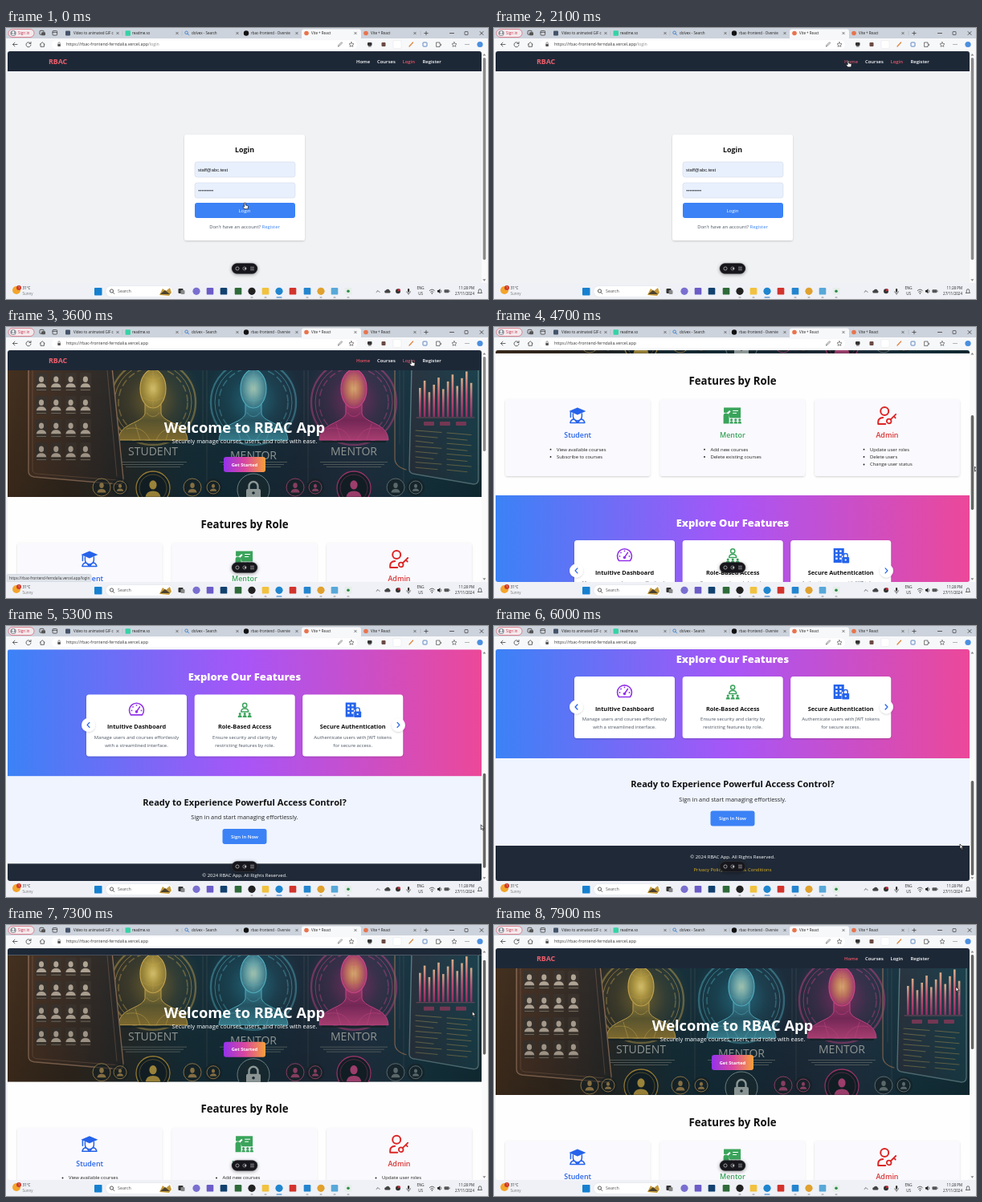
Write an HTML page that moves like this. It is 600 px wide and 338 px high and loops after 8 s.

```html
<!DOCTYPE html>
<html lang="en">
<head>
<meta charset="utf-8">
<title>RBAC App</title>
<style>
html, body { margin: 0; width: 100%; height: 100%; overflow: hidden; background: #fff; }
svg { display: block; width: 100%; height: 100%; }
text { font-family: "Open Sans", "Noto Sans", sans-serif; white-space: pre; }
.ui { font-family: "Liberation Sans", Arial, sans-serif; }
</style>
</head>
<body>
<svg id="stage" viewBox="0 0 600 338"></svg>
<script>
const LOOP = 8000, TOP = 29, MAX_SCROLL = 382;
const URL_BASE = 'https://rbac-frontend-ferndalia.vercel.app';
const REM = 5.92;

// Drawing helpers; text is placed by its vertical centre.
const text = (x, y, s, size = REM, fill = '#111', weight = 400, anchor = 'start', extra = '') =>
  `<text x="${x}" y="${y + size * 0.36}" font-size="${size}" fill="${fill}" font-weight="${weight}" text-anchor="${anchor}" ${extra}>${s}</text>`;
const mid = (x, y, s, size, fill, weight, extra) => text(x, y, s, size, fill, weight, 'middle', extra);
const rect = (x, y, w, h, fill, r = 0, extra = '') =>
  `<rect x="${x}" y="${y}" width="${w}" height="${h}" rx="${r}" fill="${fill}" ${extra}/>`;
const dot = (x, y, r, fill, extra = '') => `<circle cx="${x}" cy="${y}" r="${r}" fill="${fill}" ${extra}/>`;
const ring = (x, y, r, stroke, w = 1, extra = '') =>
  dot(x, y, r, 'none', `stroke="${stroke}" stroke-width="${w}" ${extra}`);
const line = (d, stroke = '#444', w = 0.7, extra = '') =>
  `<path d="${d}" fill="none" stroke="${stroke}" stroke-width="${w}" stroke-linecap="round" stroke-linejoin="round" ${extra}/>`;
const shape = (d, fill, extra = '') => `<path d="${d}" fill="${fill}" ${extra}/>`;
const at = (x, y, body) => `<g transform="translate(${x} ${y})">${body}</g>`;
const range = n => [...Array(n).keys()];
const stops = colors => colors.map((c, i) => `<stop offset="${i / (colors.length - 1)}" stop-color="${c}"/>`).join('');
const grad = (id, colors, down) =>
  `<linearGradient id="${id}" x2="${down ? 0 : 1}" y2="${down ? 1 : 0}">${stops(colors)}</linearGradient>`;
const radial = (id, colors) => `<radialGradient id="${id}">${stops(colors)}</radialGradient>`;

const defs = `<defs>
  ${grad('heroBg', ['#44301f', '#33291f', '#262b2a', '#17303a', '#15303d', '#1d2c3b', '#223344', '#173743', '#122f39'])}
  ${grad('shade', ['#0000', '#0008'], true)}
  ${grad('leftGlass', ['#4a3324', '#27292a'])}
  ${grad('rightGlass', ['#2a3440', '#1b414d'])}
  ${grad('explore', ['#3b82f6', '#a855f7', '#ec4899'])}
  ${grad('start', ['#9333ea', '#d946a0', '#f6a03a'])}
  ${grad('bars', ['#d8b08a', '#c4567a', '#9c2f6a'], true)}
  ${grad('gold', ['#a08a3c', '#5f5a32', '#8a7434'], true)}
  ${grad('cyan', ['#3f8ea0', '#27596a', '#3b8798'], true)}
  ${grad('pink', ['#a23c6c', '#7c2a5c', '#b8447c'], true)}
  ${radial('goldFace', ['#d8c470', '#b39c46', '#8c7a36'])}
  ${radial('cyanFace', ['#a9c9b4', '#6fa6a8', '#38798a'])}
  ${radial('pinkFace', ['#dcb070', '#c2785e', '#a23c6c'])}
  ${radial('goldGlow', ['#a08030', '#a0803055', '#a0803000'])}
  ${radial('cyanGlow', ['#2f90a8', '#2f90a855', '#2f90a800'])}
  ${radial('pinkGlow', ['#a82c74', '#a82c7455', '#a82c7400'])}
  <filter id="soft" x="-20%" y="-20%" width="140%" height="150%"><feDropShadow dx="0" dy="1" stdDeviation="1.3" flood-opacity=".18"/></filter>
  <filter id="float" x="-40%" y="-60%" width="180%" height="240%"><feDropShadow dx="0" dy="1" stdDeviation="2.2" flood-opacity=".4"/></filter>
  <clipPath id="view">${rect(2, TOP, 590, 289, '#000', 3)}</clipPath>
  <clipPath id="heroClip">${rect(2, 54, 590, 158, '#000')}</clipPath>
</defs>`;

// Browser chrome
function tab(x, icon, title, closeX) {
  return icon + text(x, 6.5, title, 4.5, '#222') +
    line(`M${closeX - 1.3} 5.2l2.6 2.6m0-2.6l-2.6 2.6`, '#333', 0.6);
}
function chrome() {
  const plus = (x, y, r) => `M${x - r} ${y}h${2 * r}M${x} ${y - r}v${2 * r}`;
  const star = x => line(`M${x} 17.6l.9 1.9 2.1.3-1.5 1.4.4 2.1-1.9-1-1.9 1 .4-2.1-1.5-1.4 2.1-.3z`, '#444', 0.6);
  return rect(0, 0, 600, 338, '#f3f4f7') + rect(0, 0, 600, 13.5, '#cdd3dc') +
    rect(0, 13, 600, 16, '#f7f8fa') +
    rect(368, 1.5, 74, 13, '#f7f8fa', 3) +
    rect(3, 1.5, 32, 10, '#f4e9ec', 5, 'stroke="#d9485a" stroke-width=".6"') +
    dot(9, 6.5, 3.6, '#8a9099') + dot(9, 5.4, 1.3, '#fff') + shape('M6.6 8.8a2.5 2.2 0 0 1 4.8 0z', '#fff') +
    text(15, 6.5, 'Sign in', 4.7, '#c4314b') +
    rect(42, 3.3, 5, 5, 'none', 1, 'stroke="#333" stroke-width=".8"') + rect(44, 5.3, 5, 4, '#555', 1) +
    rect(58, 3.5, 5.6, 5.6, 'none', 1, 'stroke="#333" stroke-width=".7"') + line('M58 5.4h5.6', '#333') +
    tab(84, rect(74, 3.5, 6, 6, '#44536a', 1), 'Video to animated GIF c', 139) +
    tab(157, rect(148.5, 3.2, 6.5, 6.5, '#35d3a5', 1), 'readme.so', 213) +
    tab(231, ring(224.6, 5.8, 1.8, '#2878d0', 0.8) + line('M226 7.2l1.7 1.7', '#2878d0', 0.8), 'dolvex - Search', 288) +
    tab(305, dot(299, 6.5, 3.2, '#111'), 'rbac-frontend - Overvie', 362) +
    tab(380, dot(374, 6.5, 2.8, '#e8744e'), 'Vite + React', 435) +
    tab(454, dot(448, 6.5, 2.8, '#e8744e'), 'Vite + React', 509) +
    [145, 219, 293, 516].map(x => line(`M${x} 4v5`, '#a5acb8', 0.5)).join('') +
    line(plus(523, 6.5, 2.2), '#333') +
    line('M552.5 6.5h5M590 4.5l4 4m0-4l-4 4', '#222') +
    rect(571, 4.5, 4, 4, 'none', 0.5, 'stroke="#222" stroke-width=".6"') +
    line('M14 20.5H8.5m2.4-2.4l-2.4 2.4 2.4 2.4', '#444', 0.8) +
    line('M30.6 19.2a3 3 0 1 0 .4 2M31 17.5v2h-2', '#444', 0.8) +
    line('M42.2 20.5l3-2.8 3 2.8M43 20v3.3h4.4V20', '#444', 0.8) +
    rect(57, 15.2, 380, 11, '#fff', 5.5) +
    rect(64.3, 19.9, 3.6, 3, '#555', 0.6) + line('M65 19.8v-1a1.1 1.1 0 0 1 2.2 0v1', '#555', 0.6) +
    `<text x="75" y="22.4" font-size="5.25" fill="#333">${URL_BASE}<tspan id="path" fill="#888">/login</tspan></text>` +
    line('M413.5 22.8l.5-1.6 3.6-3.4 1 1-3.6 3.5z', '#444', 0.6) + star(430) +
    rect(450, 18, 5.5, 4, '#333', 1) + rect(451, 22, 3.6, 1.5, '#777') +
    rect(467.5, 18, 5, 5, '#6b4a44', 1) + rect(482, 15.5, 10, 10, '#fff', 1.5, 'stroke="#ddd" stroke-width=".4"') +
    line('M502 23l4.6-5', '#e0823a', 1.2) + rect(519, 18, 5, 5, 'none', 0.8, 'stroke="#356bb3" stroke-width=".8"') +
    line('M536 18h4v2.2h1.6v1.5H540v1.7h-4z', '#444') + star(558) +
    [572, 574, 576].map(x => dot(x, 20.5, 0.5, '#444')).join('') +
    dot(590, 20.5, 3.6, '#4b8fe0');
}

// Hero artwork
const person = (x, y, k, fill) => at(x, y, `<g transform="scale(${k})">` +
  `<ellipse cy="-3" rx="3.4" ry="4.2" fill="${fill}"/>` + shape('M-7 8Q-6 2.5 0 2.5T7 8z', fill) + '</g>');

function bust(x, y, tone, glow, label) {
  const halo = dot(x, 92, 62, `url(#${tone}Glow)`, 'opacity=".6"') +
    ring(x, 94, 53, glow, 2.4, 'opacity=".45"') + ring(x, 94, 48, glow, 0.7, 'opacity=".8"') +
    ring(x, 94, 43, glow, 1.6, 'opacity=".4" stroke-dasharray="9 4"');
  const body = shape('M-43 141C-42 119-14 121-10 108V92H10V108C14 121 42 119 43 141z', `url(#${tone})`,
    `stroke="${glow}" stroke-width="1"`) +
    line('M-8 107Q0 117 8 107M-33 127Q-12 122-4 141M33 127Q12 122 4 141M-22 121l6 20M22 121l-6 20', glow, 0.7, 'opacity=".8"');
  const head = `<ellipse cy="77" rx="16" ry="24" fill="url(#${tone}Face)" stroke="${glow}" stroke-width="1.2"/>` +
    line('M0 54v46M-11 62Q0 70 11 62M-13 88Q0 96 13 88', glow, 0.6, 'opacity=".5"');
  return halo + at(x, 0, body + head) + rect(x - 40, 142, 80, 2, '#162529') +
    mid(x, y, label, 14, '#a3a9a5');
}
function hero() {
  const faces = range(16).map(i => {
    const x = 44 + (i % 4) * 18.3, y = 68 + Math.floor(i / 4) * 29;
    return rect(x - 7, y - 11, 14, 23, '#3b342e', 1.5) + person(x, y, 0.9, '#b3a797') +
      rect(x - 6, y + 10, 12, 1, '#7a6c5c');
  }).join('');
  const bars = range(12).map(i => {
    const h = 36 + i * 1.3 + 9 * Math.sin(i * 2.1);
    return rect(514 + i * 5.8, 112 - h, 2.6, h, 'url(#bars)');
  }).join('');
  const rows = range(8).map(i =>
    line(`M510 ${129 + i * 6.6}l${32 - (i % 3) * 5} 2.5M549 ${132 + i * 6.6}l${30 - (i % 2) * 5} 2.5`, '#74734f', 0.9)).join('');
  const badge = (x, c, fill) => dot(x, 201, 21, '#14232a') + ring(x, 201, 21, c, 1.3) + ring(x, 201, 17, c, 0.5) + person(x, 201, 1.35, fill);
  const minis = [119, 142, 232, 258, 360, 385, 485, 510].map((x, i) => {
    const c = i < 4 ? '#a08550' : i < 6 ? '#a04a74' : '#6d7d80';
    return dot(x, 200, 11, '#1a2528', 'opacity=".6"') + ring(x, 200, i % 2 ? 8 : 11, c, 1) + person(x, 200, i % 2 ? 0.6 : 0.8, c);
  }).join('');
  const frame = 'stroke="#8a6c56" stroke-width="1.4"';
  return `<g clip-path="url(#heroClip)">` + rect(2, 54, 590, 158, 'url(#heroBg)') +
    [120, 245, 371, 490].map(x => line(`M${x} 54v92M${x + 5} 54v140`, '#4a585a', 0.7, 'opacity=".7"')).join('') +
    bust(183, 155, 'gold', '#c9a850', 'STUDENT') + bust(433, 155, 'pink', '#d0488c', 'MENTOR') + bust(308, 160, 'cyan', '#55b2c4', 'MENTOR') +
    [183, 308, 433].map(x => range(3).map(i => rect(x - 42 + i * 4, 168 + i * 3, 84 - i * 8, 0.8, '#66716f')).join('')).join('') +
    shape('M28 50H132L146 189q0 7-6 7L35 187q-7-1-7-7z', 'url(#leftGlass)', frame) +
    line('M33 54V178q0 4 5 5L139 191M126 54l12 132', '#7a5f4a', 0.6) + faces +
    shape('M505 50H588V190q0 6-6 6L507 183q-5-1-5-6z', 'url(#rightGlass)', 'stroke="#5b7b82" stroke-width="1.4"') +
    line('M484 54v110q0 10 14 14', '#8a6c56', 1.2) + bars + line('M511 113h72', '#a0566c') +
    [520, 540, 560].map(x => rect(x, 118, 13, 5, '#7d3c5a', 1)).join('') + rows +
    minis + badge(183, '#b0903c', '#b89c44') + badge(433, '#b43c78', '#bc4a82') +
    dot(308, 203, 20, '#1b3037') + ring(308, 203, 20, '#7e979a', 1) + rect(299, 202, 18, 14, '#a9b5b4', 2) +
    line('M302.5 202v-3.5a5.5 5.5 0 0 1 11 0v3.5', '#a9b5b4', 2.4) + dot(308, 207, 1.8, '#1b3037') +
    rect(2, 54, 590, 158, 'url(#shade)', 0, 'opacity=".35"') + '</g>' +
    mid(297, 125.4, 'Welcome to RBAC App', 18.3, '#fff', 700) +
    mid(297, 142.6, 'Securely manage courses, users, and roles with ease.', 7.35, '#fff') +
    rect(271, 162, 52, 19, 'url(#start)', 3) + mid(297, 171.7, 'Get Started', 5.7, '#fff', 700);
}

// Icons, drawn around their own centre
const icons = {
  cap: shape('M0-10L10.5-5.5 0-1-10.5-5.5z', '#2563eb') + line('M-8.5-4.5V2M-5.5-2.5V1a5.5 5.5 0 0 0 11 0v-3.5M-9 9q1-4.5 5-4.5L0 9l4-4.5q4 0 5 4.5z', '#2563eb', 1.5),
  board: shape('M-10.5-10h21V3H-3l-2-5 3-3-1.3-1.5-3.2 2.8h-4z', '#3aa45b') + line('M1-6h6M1-3h4', '#fff', 1) +
    dot(-8, -6, 2.2, '#3aa45b') + shape('M-11 10V0q0-3 3-3t4 3v10z', '#3aa45b') +
    [-1, 4.2, 9.2].map(x => dot(x, 5.4, 1.6, '#3aa45b') + shape(`M${x - 2.2} 10q0-3 2.2-3t2.2 3z`, '#3aa45b')).join(''),
  key: ring(-3, -5.5, 5, '#dc2626', 2) + line('M-11 10V8q0-5 6-5.5M-11 10.5h9', '#dc2626', 2) +
    ring(2.5, 7, 2.8, '#dc2626', 1.8) + line('M4.5 5L11-1.5M8.5 1l2 2', '#dc2626', 1.8),
  gauge: line('M-7 6.5A9 9 0 1 1 7 6.5z', '#9333ea', 1.6) + line('M0 2.5L4-3.5', '#9333ea', 1.6) + dot(0, 2.5, 1.8, '#9333ea') +
    [[-6, 1], [-4.5, -3.5], [0, -5.5], [6, 1]].map(p => dot(...p, 0.9, '#9333ea')).join(''),
  team: ring(0, -5.5, 2.6, '#3aa45b', 1.5) + line('M-4.5 2.5q0-4 4.5-4t4.5 4z', '#3aa45b', 1.5) +
    [-6, 0, 6].map(x => dot(x, 5, 1.5, '#3aa45b') + shape(`M${x - 2.5} 9.5q0-3 2.5-3t2.5 3z`, '#3aa45b')).join(''),
  vault: shape('M-9 9V-9H4V-1Q1 0 1 3V9z', '#2563eb') + range(6).map(i => rect(-6.5 + (i % 2) * 5, -6.5 + Math.floor(i / 2) * 4.6, 2.4, 2.4, '#fff')).join('') +
    rect(1.5, 2, 9, 7.5, '#2563eb', 1) + line('M3.5 2V0a2.5 2.5 0 0 1 5 0v2', '#2563eb', 1.4) + dot(6, 5.6, 1.1, '#fff')
};

function roleCard(x, icon, title, color, listX, items) {
  const c = x + 90.2;
  return rect(x, 269, 180.4, 96, '#faf9fd', 3.5, 'filter="url(#soft)"') + at(c - 0.3, 289.5, icons[icon]) +
    mid(c, 314.3, title, 8.88, color, 600) +
    items.map((s, i) => dot(listX - 7.5, 331.7 + i * 9.4, 0.95, '#222') + text(listX, 331.5 + i * 9.4, s, REM, '#222')).join('');
}
function featureCard(x, icon, title, a, b) {
  const c = x + 62.5;
  return rect(x, 445, 125, 77, '#fff', 3.5, 'filter="url(#soft)"') + at(c, 464, icons[icon]) +
    mid(c, 485, title, 7.35, '#111', 700) + mid(c, 498.3, a, REM, '#4b5563') + mid(c, 508, b, REM, '#4b5563');
}
function homePage() {
  const arrow = (x, dir) => dot(x, 483, 8.5, '#fff', 'filter="url(#soft)"') +
    line(`M${x - dir * 1.4} 480l${dir * 2.8} 3 ${-dir * 2.8} 3`, '#2563eb', 1.3);
  return rect(2, 54, 590, 336, '#fefefe') + hero() +
    mid(297, 246, 'Features by Role', 13.25, '#111', 700) +
    roleCard(14, 'cap', 'Student', '#2563eb', 78, ['View available courses', 'Subscribe to courses']) +
    roleCard(206.7, 'board', 'Mentor', '#3aa45b', 269.5, ['Add new courses', 'Delete existing courses']) +
    roleCard(399.3, 'key', 'Admin', '#d93232', 468, ['Update user roles', 'Delete users', 'Change user status']) +
    rect(2, 389, 590, 158, 'url(#explore)') + mid(297, 423, 'Explore Our Features', 13, '#fff', 800) +
    featureCard(100, 'gauge', 'Intuitive Dashboard', 'Manage users and courses effortlessly', 'with a streamlined interface.') +
    featureCard(234.7, 'team', 'Role-Based Access', 'Ensure security and clarity by', 'restricting features by role.') +
    featureCard(369.2, 'vault', 'Secure Authentication', 'Authenticate users with JWT tokens', 'for secure access.') +
    arrow(102.5, -1) + arrow(488.5, 1) +
    rect(2, 547, 590, 109, '#eff4ff') +
    mid(297, 579.5, 'Ready to Experience Powerful Access Control?', 11.1, '#111', 700) +
    mid(297, 598, 'Sign in and start managing effortlessly.', 7.4, '#222') +
    rect(269.5, 612.5, 55, 19, '#3b82f6', 3) + mid(297, 622, 'Sign In Now', 6, '#fff', 600) +
    rect(2, 656, 590, 45, '#1f2937') +
    mid(297, 670.3, '© 2024 RBAC App. All Rights Reserved.', REM, '#fff') +
    mid(297, 686, 'Privacy Policy | Terms &amp; Conditions', REM, '#e3b21b');
}
function loginPage() {
  const field = y => rect(235, y, 125, 19, '#e8f0fe', 3, 'stroke="#d3dae6" stroke-width=".6"');
  return rect(2, 54, 590, 264, '#f1f2f4') + rect(222, 133, 150, 132, '#fff', 3, 'filter="url(#soft)"') +
    mid(297, 151.7, 'Login', 8.88, '#111', 700) + field(167) + field(193) +
    text(239, 177, 'staff@abc.test', 5.8, '#111', 400, 'start', 'class="ui"') +
    range(9).map(i => dot(240.3 + i * 2.1, 202.8, 0.75, '#111')).join('') +
    rect(235, 218, 125, 19, '#3b82f6', 3) + mid(297, 227.7, 'Login', REM, '#fff') +
    mid(297, 248, 'Don\'t have an account? <tspan fill="#3b82f6">Register</tspan>', REM, '#4b5563');
}

const links = [['Home', 436, 17.5], ['Courses', 462, 22.5], ['Login', 493.5, 16], ['Register', 518.5, 22.5]];
const navBar = rect(2, TOP, 590, 25, '#1d2837') + text(53, 42.2, 'RBAC', 8.9, '#ef5f6c', 700) +
  links.map(([s, x]) => text(x, 42, s, REM, '#fff', 600, 'start', 'class="link"')).join('');

const pill = rect(281, 293.5, 32, 13, '#18181b', 6.5, 'stroke="#3f3f46" stroke-width=".4" filter="url(#float)"') +
  ring(288, 300, 2.1, '#ccc', 0.7) + ring(297, 300, 2.1, '#aaa', 0.7) + dot(298, 300, 1.1, '#ccc') +
  [298.2, 300, 301.8].map(y => line(`M304.5 ${y}h4`, '#ccc', 0.6)).join('');

function taskbar() {
  const apps = [[237, '#7a6fd0', 1], [254, '#6b5cc7'], [271, '#12416f'], [289, '#2f6b3a'], [306, '#222', 1], [323, '#f2c23e'],
    [340, '#1f86cf', 1], [357, '#d2342d'], [375, '#2385d0'], [392, '#e0a12e', 1], [409, '#58a8d8'], [426, '#e6eee8']];
  return rect(0, 318, 600, 20, '#eff1f6') + dot(13, 327, 5, '#f3a52b') + dot(16, 324, 3, '#cf3a2c') + mid(16, 324, '1', 3.6, '#fff') +
    text(20.5, 324.7, '31°C', 4.5, '#222') + text(20.5, 331.6, 'Sunny', 4.5, '#777') +
    rect(110, 324, 9.5, 9.5, '#1580d0', 0.8) +
    rect(124, 321.5, 84, 14, '#fff', 7, 'stroke="#d9dce2" stroke-width=".5"') +
    ring(131.5, 328, 2.1, '#333', 0.8) + line('M133 329.6l1.8 1.9', '#333', 0.8) + text(139, 328.5, 'Search', 5.3, '#555') +
    shape('M191 333L195 325l4 3 5-4 2 6-3 4z', '#c59a3b') + shape('M192 332l6-5 6 5z', '#4b412f') +
    rect(214.5, 325, 6, 6, '#333', 1) + rect(217.5, 327, 5, 5, '#888', 1) +
    apps.map(([x, c, round]) => round ? dot(x, 328.3, 4.6, c) : rect(x - 4.3, 324, 8.6, 8.6, c, 1.2)).join('') +
    dot(426, 328.3, 1.8, '#2c8b4a') +
    [306, 323, 375, 392, 409, 426].map(x => rect(x - 1.5, 335.6, 3, 1, '#888', 0.5)).join('') + rect(336.5, 335.6, 7, 1, '#1d6fc0', 0.5) +
    line('M461 329.5l2-2 2 2', '#333') + shape('M472 330.5a2 2 0 0 1 1-3.6 2.6 2.6 0 0 1 4.6.7 1.6 1.6 0 0 1 0 2.9z', '#444') +
    dot(488, 328.3, 3, '#333') + dot(489.5, 326.7, 1.5, '#d23') +
    rect(500, 325, 2.2, 4.5, '#333', 1.1) + line('M498.7 328.6a2.4 2.4 0 0 0 4.8 0M501.1 331v1.5', '#333', 0.6) +
    mid(516, 324.8, 'ENG', 4.5, '#222') + mid(516, 331.6, 'US', 4.5, '#222') +
    line('M527.3 327.5q3-3 6 0M528.6 329.2q1.7-1.7 3.4 0', '#222') + dot(530.3, 331, 0.7, '#222') +
    shape('M537 327h1.4l2-1.7v6l-2-1.7H537z', '#222') + line('M541.6 327q1 1.3 0 2.6', '#222', 0.6) +
    rect(545.5, 326.3, 6, 4, '#555', 1) + rect(551.7, 327.5, 0.8, 1.6, '#555') +
    text(583, 324.8, '11:28 PM', 4.5, '#222', 400, 'end') + text(583, 331.6, '27/11/2024', 4.5, '#222', 400, 'end') +
    line('M587.5 330.5h5l-.8-1.4v-1.7a1.7 1.7 0 0 0-3.4 0v1.7z', '#333', 0.7);
}

const edge = 'stroke="#111" stroke-width=".7" stroke-linejoin="round"';
const arrowShape = shape('M0 0V6L1.4 4.8 2.4 7 3.4 6.6 2.4 4.4H4.2z', '#fff', edge);
const handShape = shape('M-.8 .6a.8.8 0 0 1 1.6 0V3l2.6.6q.8.2.7 1L3.6 7.8H-.6L-2.5 5.2q-.3-1 .6-.9l1.1.7z', '#fff', edge);

document.getElementById('stage').innerHTML = defs + chrome() +
  `<g clip-path="url(#view)"><g id="page"><g id="login">${loginPage()}</g><g id="home">${homePage()}</g>${navBar}</g></g>` +
  rect(592, TOP, 7, 289, '#fafafa') + shape('M593.4 34.6h4l-2-2.6z', '#888') + shape('M593.4 313.2h4l-2 2.6z', '#888') +
  rect(593.7, 37, 3.6, 252, '#8b8b8b', 1.8, 'id="thumb"') + pill +
  `<g id="status">${rect(1, 308.5, 105, 9.5, '#dfe3ea', 1.5, 'id="statusBox" stroke="#c3c8d0" stroke-width=".5"')}` +
  text(4, 313, '', 4.55, '#333', 400, 'start', 'id="statusText"') + '</g>' + taskbar() +
  `<g id="cursor"><g id="arrow">${arrowShape}</g><g id="hand">${handShape}</g></g>`;

// Pointer path: time, x, y
const path = [[0, 297.5, 218], [900, 299, 222], [1700, 441, 41], [2700, 441, 41], [3400, 505, 41], [3650, 505, 41],
  [4100, 594, 101], [4700, 598.5, 174], [5400, 590, 260], [6000, 580, 272], [6300, 582, 266], [6800, 587, 161.5],
  [7400, 579, 97], [7900, 575, 77], [8000, 575, 77]];
const OPEN_HOME = 2300, GRAB = 4100;
const statuses = [[0, null], [2200, ''], [3350, '/login'], [3800, null]];

const $ = id => document.getElementById(id);
const show = (id, on) => $(id).setAttribute('visibility', on ? 'visible' : 'hidden');
const clamp = (v, a, b) => Math.min(b, Math.max(a, v));
const linkNodes = document.querySelectorAll('.link');

function pointer(t) {
  const i = path.findIndex(p => p[0] > t), [t0, x0, y0] = path[i - 1], [t1, x1, y1] = path[i];
  const k = (t - t0) / (t1 - t0);
  return [x0 + (x1 - x0) * k, y0 + (y1 - y0) * k];
}

function draw(t) {
  const [x, y] = pointer(t), home = t >= OPEN_HOME;
  const ratio = home ? 274 / (289 + MAX_SCROLL) : 274 / 314;
  // The pointer drags the scrollbar thumb once it is grabbed.
  const scroll = t < GRAB ? 0 : clamp((y - 101) / ratio, 0, MAX_SCROLL);
  show('home', home);
  show('login', !home);
  $('path').textContent = home ? '' : '/login';
  $('page').setAttribute('transform', `translate(0 ${-scroll})`);
  $('thumb').setAttribute('y', 37 + scroll * ratio);
  $('thumb').setAttribute('height', 289 * ratio);
  $('thumb').setAttribute('fill', t >= GRAB ? '#666' : '#8b8b8b');

  let over = !home && x > 235 && x < 360 && y >= 218 && y < 237;
  links.forEach(([name, lx, w], i) => {
    const hover = t < GRAB && x >= lx && x <= lx + w && y > 36 && y < 48;
    const active = name === (home ? 'Home' : 'Login');
    over = over || hover;
    linkNodes[i].setAttribute('fill', active ? '#ef5565' : hover ? '#c6566a' : '#fff');
  });

  const status = statuses.filter(s => s[0] <= t).pop()[1];
  show('status', status !== null);
  if (status !== null) {
    $('statusText').textContent = URL_BASE + status;
    $('statusBox').setAttribute('width', status ? 105 : 93);
  }
  $('cursor').setAttribute('transform', `translate(${x} ${y})`);
  show('hand', over);
  show('arrow', !over);
}

function tick() {
  draw(performance.now() % LOOP);
  requestAnimationFrame(tick);
}
tick();
</script>
</body>
</html>
```
